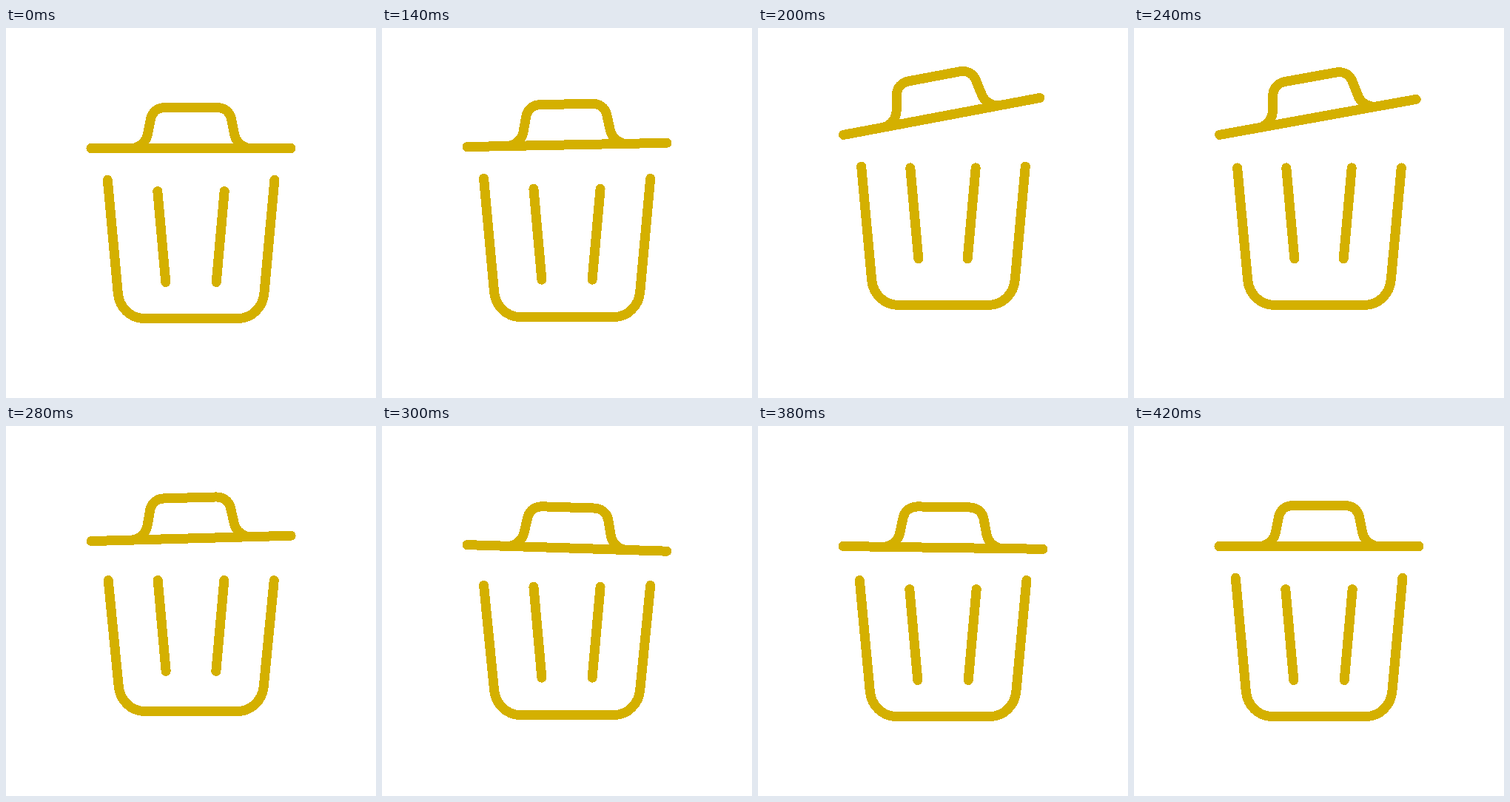
Recreate the animation shown at these times as an HTML page. Size 500 by 500 pixels, loop 0.54 s.

```html
<!DOCTYPE html>
<html lang="en">
<head>
<meta charset="utf-8">
<title>Trash can</title>
<style>
html, body { margin: 0; width: 100%; height: 100%; overflow: hidden; background: #fff; }
svg { display: block; width: 100vw; height: 100vh; shape-rendering: crispEdges; }
path { fill: none; stroke: #d4b000; stroke-width: 13; stroke-linecap: round; stroke-linejoin: round; }
</style>
</head>
<body>
<svg viewBox="0 0 500 500">
  <path id="lid" d="M115 162.5H385M170 162.5C180 162 189.3 154 191.3 144L195.7 122C198 113 205.5 107.5 215 107.5H285C294.5 107.5 302 113 304.3 122L308.7 144C310.7 154 320 162 330 162.5"/>
  <path id="can"/>
  <path id="ribs"/>
</svg>
<script>
const LOOP = 540, STEP = 20;
const START = 120, PEAK = 220, LAND = 320, END = 420;
const [lid, can, ribs] = ['lid', 'can', 'ribs'].map(id => document.getElementById(id));

// Sine ease from a to b between times t0 and t1
function ease(t, t0, t1, a, b) {
  const p = Math.min(1, Math.max(0, (t - t0) / (t1 - t0)));
  return a + (b - a) * (1 - Math.cos(Math.PI * p)) / 2;
}

// Rise to the peak, fall past rest to `over` at `dip`, then settle
function bounce(t, peak, over, dip) {
  if (t < PEAK) return ease(t, START, PEAK, 0, peak);
  if (t < dip) return ease(t, PEAK, dip, peak, over);
  return ease(t, dip, END, over, 0);
}

function draw(now) {
  const t = Math.floor((now % LOOP) / STEP) * STEP;
  const hop = bounce(t, 1, 0, LAND);
  const angle = bounce(t, -11.8, 2.6, 314);
  const rim = 205.3 + bounce(t, -20, 11, 310);

  lid.setAttribute('transform',
    `translate(${0.6 * hop} ${-20 * hop}) rotate(${angle} 115 162.5)`);

  const y = 392.5 - 20 * hop;
  const l = v => v + 2.6 * hop, r = v => 500.2 - v - 1.8 * hop;
  can.setAttribute('d',
    `M${l(137.3)} ${rim}L${l(151.3)} ${y - 34}` +
    `C${l(153)} ${y - 15} ${l(168)} ${y} ${l(187)} ${y}` +
    `L250 ${y + 0.6 * hop}L${r(187)} ${y}` +
    `C${r(168)} ${y} ${r(153)} ${y - 15} ${r(151.3)} ${y - 34}L${r(137.3)} ${rim}`);

  const dx = 1.1 * hop, dy = -35 * hop;
  ribs.setAttribute('d',
    `M${204.8 + dx} ${220.5 + dy}L${215.8 + dx} ${343.5 + dy}` +
    `M${295.2 - dx} ${220.5 + dy}L${284.2 - dx} ${343.5 + dy}`);
}

const begin = performance.now();
function tick() {
  draw(performance.now() - begin);
  requestAnimationFrame(tick);
}
tick();
</script>
</body>
</html>
```
